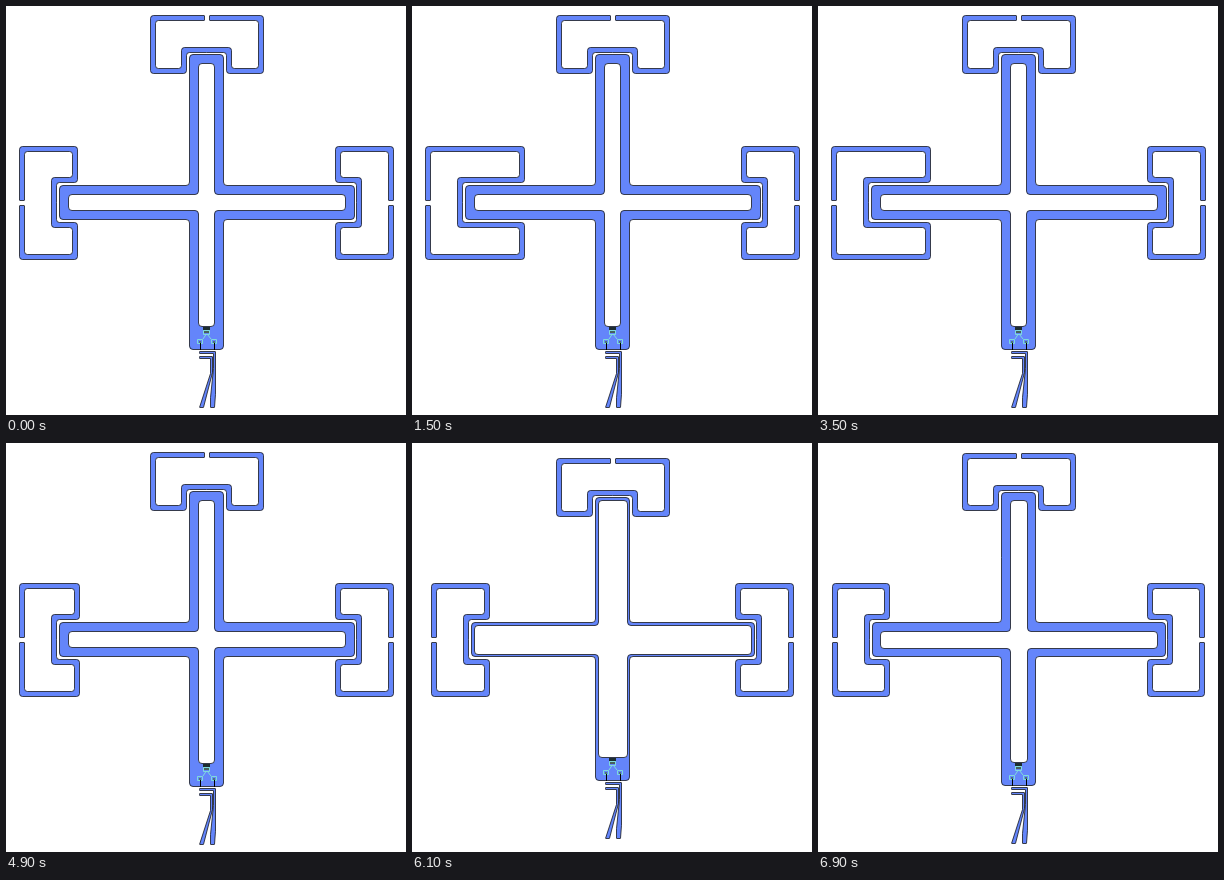
An HTML page with a canvas for the animation above (7 s loop, 400 by 409 pixels).

```html
<!DOCTYPE html>
<html lang="en">
<head>
<meta charset="utf-8">
<title>Cross qubit geometry sweep</title>
<style>
  html, body { margin: 0; width: 100%; height: 100%; overflow: hidden; background: #fff; }
  canvas { display: block; }
</style>
</head>
<body>
<canvas id="stage" width="400" height="409"></canvas>
<script>
const ctx = document.getElementById('stage').getContext('2d');
const BLUE = '#6485fa', EDGE = 'rgba(0,0,0,.7)';
const CX = 200.9, CY = 196.9, DEPTH = 57.7;
const STEP = 100, FRAMES = 70;

const snap = v => Math.floor(v) + 0.5;

// Traces a closed polygon with filleted corners; a third entry overrides the radius.
function trace(pts, radius) {
  const n = pts.length;
  const dist = (a, b) => Math.hypot(a[0] - b[0], a[1] - b[1]);
  const last = pts[n - 1];
  ctx.moveTo((last[0] + pts[0][0]) / 2, (last[1] + pts[0][1]) / 2);
  pts.forEach((p, i) => {
    const prev = pts[(i + n - 1) % n], next = pts[(i + 1) % n];
    const r = Math.min(p[2] ?? radius, dist(p, prev) / 2, dist(p, next) / 2);
    ctx.arcTo(p[0], p[1], next[0], next[1], r);
  });
  ctx.closePath();
}

// Fills and outlines polygons, with edges kept on whole pixels.
function shape(radius, ...polys) {
  ctx.beginPath();
  for (const p of polys) trace(p.map(([x, y, r]) => [snap(x), snap(y), r]), radius);
  ctx.fillStyle = BLUE;
  ctx.fill('evenodd');
  ctx.strokeStyle = EDGE;
  ctx.lineWidth = 1;
  ctx.stroke();
}

// Split-ring coupler: u runs from its outer edge inward, v sideways.
function coupler(d, place) {
  const w = 5;
  const half = [
    [37, 20], [d, 20], [d, 56.6], [0, 56.6], [0, 2.8, 0.5],
    [w, 2.8, 0.5], [w, 56.6 - w], [d - w, 56.6 - w], [d - w, 20 + w], [37 - w, 20 + w]
  ];
  const mirror = half.map(([u, v, r]) => [u, -v, r]).reverse();
  shape(3, [...half, ...mirror].map(([u, v, r]) => [...place(u, v), r]));
}

function plus(left, top, right, bottom, hw) {
  const x0 = CX - hw, x1 = CX + hw, y0 = CY - hw, y1 = CY + hw;
  return [
    [x0, top], [x1, top], [x1, y0], [right, y0], [right, y1], [x1, y1],
    [x1, bottom], [x0, bottom], [x0, y1], [left, y1], [left, y0], [x0, y0]
  ];
}

function box(color, x, y, w, h) {
  ctx.fillStyle = color;
  ctx.fillRect(x, y, w, h);
}

function junction() {
  box('#1c2c30', 197, 321, 7, 3);
  box('#46605c', 198, 324, 5, 3);
  ctx.strokeStyle = '#7fdcdc';
  ctx.lineWidth = 1;
  ctx.beginPath();
  ctx.rect(197.5, 324.5, 6, 4);
  ctx.moveTo(200, 328.5);
  ctx.lineTo(197, 333);
  ctx.moveTo(201.5, 328.5);
  ctx.lineTo(205, 333);
  for (const x of [191.5, 205.5]) ctx.rect(x, 333.5, 5, 4);
  ctx.stroke();
  for (const x of [194, 208]) {
    box('#4b7a72', x - 1, 335, 2, 2);
    box('#000', x, 337, 1, 7);
  }
}

function fluxLine() {
  shape(0.3,
    [[193, 345], [209, 345], [209, 388], [208, 401], [204, 401],
     [204, 391], [207, 362], [207, 347], [193, 347]],
    [[193, 350], [206, 350], [206, 366], [197, 401], [193, 401],
     [204, 367], [204, 352], [193, 352]]);
}

// Rises and falls linearly, peaking at n / 2.
const triangle = (i, n) => Math.min(i, n - i);

function draw(i) {
  const grow = i < 50 ? 2.78 * triangle(i, 50) : 0;
  const s = i < 50 ? 0 : 0.7 * triangle(i - 50, 20);

  ctx.fillStyle = '#fff';
  ctx.fillRect(0, 0, 400, 409);

  coupler(DEPTH + grow, (u, v) => [13.5 + s + u, CY + v]);
  coupler(DEPTH, (u, v) => [387.5 - s - u, CY + v]);
  coupler(DEPTH, (u, v) => [CX + v, 9.5 + s + u]);

  shape(3.5,
    plus(53.5 + s, 48.5 + s, 348.3 - s, 343.6 - s, 17),
    plus(62.5, 57.5, 339.3, 320.5 - s, 8 + s));

  ctx.save();
  ctx.translate(0, -Math.round(s));
  junction();
  fluxLine();
  ctx.restore();
}

const start = performance.now();
let shown = -1;
function tick() {
  const i = Math.floor(Math.max(0, performance.now() - start) / STEP) % FRAMES;
  if (i !== shown) draw(shown = i);
  requestAnimationFrame(tick);
}
tick();
</script>
</body>
</html>
```
